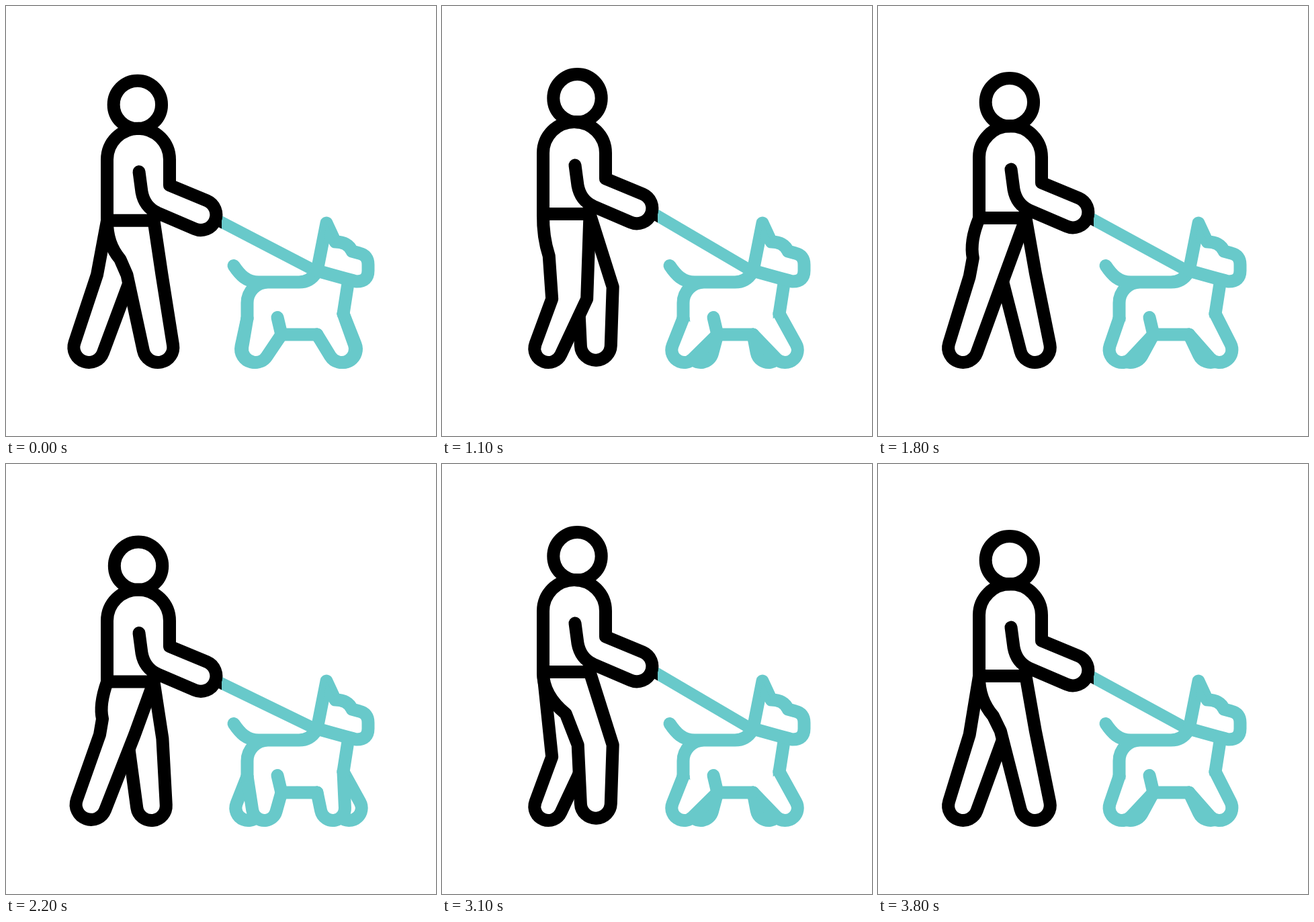
Recreate the animation shown at these times as an HTML page with a canvas. Size 640 by 640 pixels, loop 3900 ms.

```html
<!DOCTYPE html>
<html lang="en">
<head>
<meta charset="utf-8">
<title>Walking the dog</title>
<style>
html, body { margin: 0; width: 100%; height: 100%; overflow: hidden; background: #fff; }
canvas { display: block; width: 640px; height: 640px; }
</style>
</head>
<body>
<canvas id="stage" width="640" height="640"></canvas>
<script>
const ctx = document.getElementById('stage').getContext('2d');
const INK = '#000', TEAL = '#68c9ca';
const LOOP = 3900, TICK = 100;
const STRIDE = 4000, HALF = STRIDE / 2;
const SWING_START = 2100, SWING_END = 3400;
const HIP_Y = 318, GROUND = 530.5;

const mix = (a, b, u) => a + (b - a) * u;
const ease = u => (1 - Math.cos(Math.PI * u)) / 2;
const beat = (time, peak) => Math.cos(2 * Math.PI * (time - peak) / HALF);
// A slightly pointed wave, repeating once per step.
const wave = (time, peak) => beat(time, peak) - 0.13 * beat(3 * time, 75);

const bodyDrop = time => 9 * wave(time, 320) - 2;
const headX = time => 198.9 + 3.2 * beat(time, 900);
const nearPaw = time => 2 - 20 * wave(time, 420);
const farPaw = time => 16 * wave(time, 340) - 4;

// The foot glides back along the ground, then swings forward with a small lift.
function foot(time) {
  const t = time % STRIDE, back = 123, front = 240;
  const radius = 22.5 - 2 * Math.max(0, Math.sin(2 * Math.PI * t / STRIDE));
  if (t > SWING_START && t < SWING_END) {
    const u = (t - SWING_START) / (SWING_END - SWING_START);
    return { x: mix(back, front, ease(u ** 0.85)), radius, lift: 5 * Math.sin(Math.PI * u) };
  }
  const u = ((t - SWING_END + STRIDE) % STRIDE) / (STRIDE - SWING_END + SWING_START);
  return { x: mix(front, back, ease(u)), radius, lift: 0 };
}

// The knee lies on the line from hip to ankle, pushed forward by the bend.
function knee(time, footX) {
  const bend = 14.5 - 9 * beat(time, -100);
  const y = 390 + 1.7 * bend + 9 * Math.sin(2 * Math.PI * time / STRIDE);
  return [mix(151, footX - 22, (y - HIP_Y) / 190) + bend, y];
}

function line(path, color, width = 19) {
  ctx.strokeStyle = color;
  ctx.lineWidth = width;
  ctx.stroke(path);
}

function outlined(path, color) {
  ctx.fillStyle = '#fff';
  ctx.fill(path);
  line(path, color);
}

// Wraps a path from a left point, under a round foot, up to a right point.
function wrapFoot(path, left, cx, r, right, lift = 0) {
  const cy = GROUND - r - lift;
  const angle = ([x, y], side) => {
    const dx = x - cx, dy = y - cy;
    return Math.atan2(dy, dx) + side * Math.acos(Math.min(1, r / Math.hypot(dx, dy)));
  };
  path.lineTo(...left);
  path.arc(cx, cy, r, angle(left, -1), angle(right, 1), true);
  path.lineTo(...right);
}

function humanLeg(time, drop, near) {
  const { x, radius, lift } = foot(time);
  const [kx, ky] = knee(time, x);
  const path = new Path2D();
  path.moveTo(150.5, HIP_Y + drop);
  if (near) {
    const thighX = mix(151, kx, 0.65);
    path.quadraticCurveTo(Math.min(150, thighX - 5), 352 + drop, thighX, 376 + drop / 2);
  }
  wrapFoot(path, [kx, ky], x, radius, [kx + 52, ky], lift);
  path.lineTo(220, HIP_Y + drop);
  outlined(path, INK);
}

function dogLegs(reach) {
  const r = 20 - Math.abs(reach) * 0.14;
  const hind = new Path2D(), fore = new Path2D();
  wrapFoot(hind, [359, 465], 371 - reach, r, [410, 489]);
  wrapFoot(fore, [463, 489], 500 + reach, r, [502, 458]);
  outlined(hind, TEAL);
  outlined(fore, TEAL);
}

const dogBody = new Path2D(
  'M339 386.5C348 400 358 411 376 411H436Q453 411 462 396' +
  'M390 411A31 31 0 0 0 359 442V465' +
  'M404 463.5L410 489H463M509 413L502 458');
const dogHead = new Path2D(
  'M463 394L477 323L490 351Q509 351 515 365L526 368Q539 371 539 385V394' +
  'Q539 410 522 410Q518 409.5 463 394Z');
const ear = new Path2D('M477 323L490 351L472 353Z');
const torso = new Path2D(
  'M150.5 317.5V227A46.5 46.5 0 0 1 243.5 227V265L299 288' +
  'A22.5 22.5 0 1 1 281 330L225 306Q206 297 202 275L198 245M150.5 317.5H220');

function leash(drop, color, x, width) {
  const path = new Path2D();
  path.moveTo(317, 318 + drop);
  path.lineTo(460, 394);
  ctx.save();
  ctx.beginPath();
  ctx.rect(x, 0, width, 640);
  ctx.clip();
  ctx.lineCap = 'butt';
  line(path, color, 17.5);
  ctx.restore();
}

function draw(time) {
  const drop = bodyDrop(time);
  ctx.fillStyle = '#fff';
  ctx.fillRect(0, 0, 640, 640);

  leash(drop, TEAL, 321, 319);
  dogLegs(farPaw(time));
  dogLegs(nearPaw(time));
  line(dogBody, TEAL);
  outlined(dogHead, TEAL);
  ctx.fillStyle = TEAL;
  ctx.fill(ear);

  humanLeg(time + HALF, drop, false);
  humanLeg(time, drop, true);
  leash(drop, INK, 0, 321);
  ctx.save();
  ctx.translate(0, drop);
  line(torso, INK);
  const head = new Path2D();
  head.arc(headX(time), 145.2, 35.7, 0, 2 * Math.PI);
  line(head, INK);
  ctx.restore();
}

ctx.lineCap = ctx.lineJoin = 'round';
const start = performance.now();
function tick() {
  const elapsed = (performance.now() - start) % LOOP;
  draw(Math.floor(elapsed / TICK) * TICK);
  requestAnimationFrame(tick);
}
tick();
</script>
</body>
</html>
```
